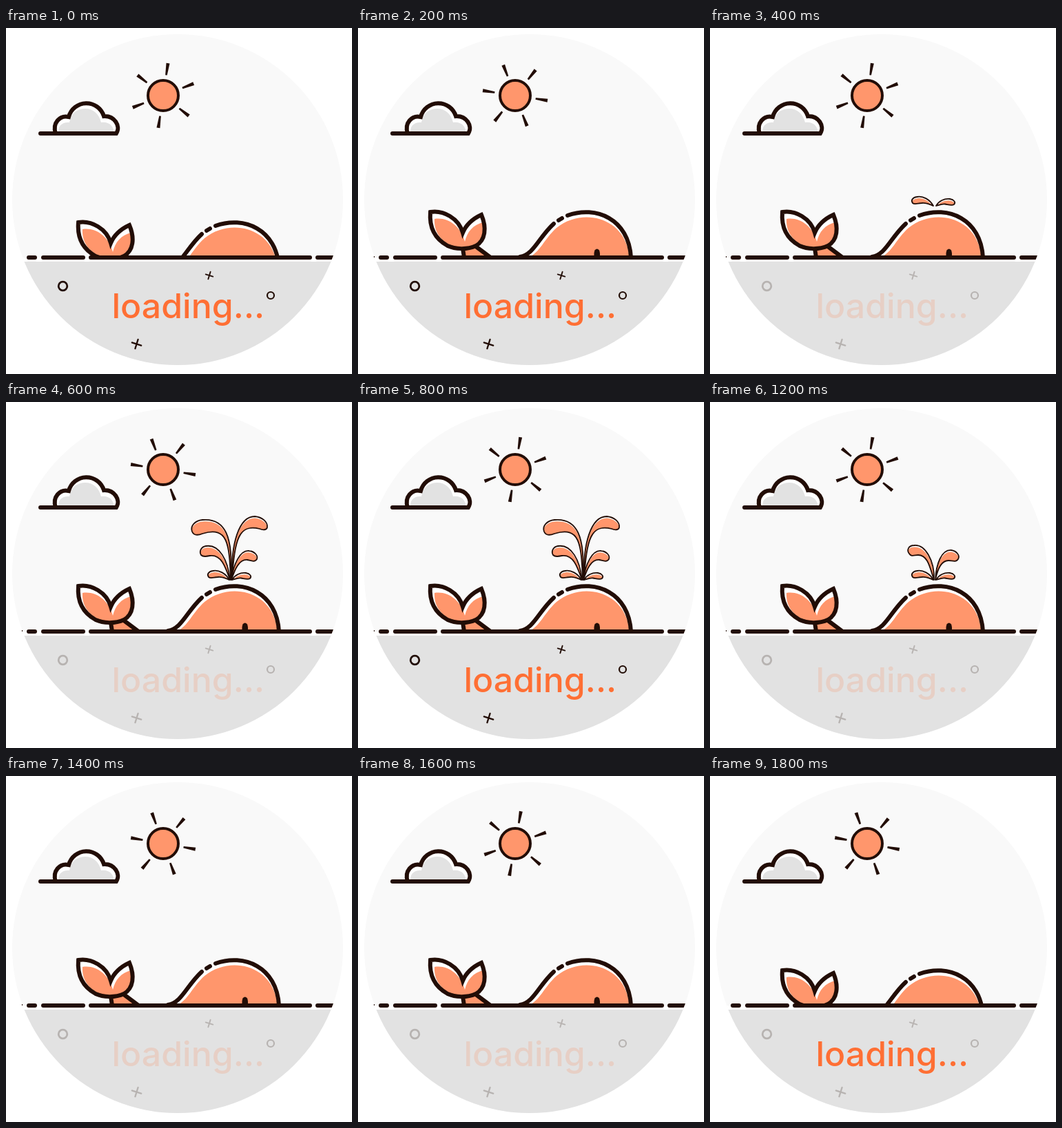
Write an HTML page with a canvas that moves like this. It is 502 px wide and 502 px high and loops after 1900 ms.

```html
<!DOCTYPE html>
<html lang="en">
<head>
<meta charset="utf-8">
<title>Loading whale</title>
<style>
html, body { margin: 0; width: 100%; height: 100%; overflow: hidden; background: #fff; }
canvas { display: block; }
</style>
</head>
<body>
<canvas id="stage" width="502" height="502"></canvas>
<script>
const ctx = document.getElementById('stage').getContext('2d');
const INK = '#220d06', ORANGE = '#ff966c', WHITE = '#fff', GREY = '#e2e2e2';
const LOOP = 1900;

const path = d => new Path2D(d);
const disc = (x, y, r) => {
  const p = new Path2D();
  p.arc(x, y, r, 0, Math.PI * 2);
  return p;
};

const world = disc(249, 249, 240);
const cloud = path('M72 153C67 138 78 126 91 129A26.5 26.5 0 0 1 142 128C157 127 167 142 160 153H50');
const cloudFill = path('M72 153C67 138 78 126 91 129A26.5 26.5 0 0 1 142 128C157 127 167 142 160 153Z');
const cloudShade = path('M77 153C74 142 82 136 92 137C94 123 104 117 115 117S135 124 138 137C148 135 158 142 156 153Z');
const waves = path('M33 333H42M54 333H112M123 333H441M452 333H490');
const waveTip = path('M23 331h1v2h-1z');

const tail = path('M105 267C124 264 146 276 152 297C157 285 166 277 179 271C187 290 185 308 171 316C158 322 141 321 130 316C112 306 103 290 105 267Z');
const tailShade = path('M111 277C130 274 149 287 155 310C158 296 167 285 182 282L183 295C181 309 172 317 160 319L140 318C118 309 110 294 111 277Z');
const stem = path('M152 320L154 333H191Q183 328 171 317Z');
const stemEdge = path('M152 320L154 333M171 317L191 332');
const body = path('M235 333C255 329 262 304 284 284Q292 276 304 272C345 257 393 277 396 333Z');
const bodyShade = path('M247 333C264 326 270 306 288 290C322 262 378 272 391 318L394 333Z');
const bodyEdge = path('M235 332C255 329 262 304 284 284M291 279L296 276M304 272C345 257 393 277 396 333');
const eye = path('M342.5 333V327A4.2 6.5 0 0 1 351 327V333Z');

const smallJets = [
  'M324 258C319 249 309 243 300 245C294 246 291 250 294 254C297 257 302 254 307 254C314 253 319 256 324 258',
  'M328 258C332 251 340 247 348 248C354 249 357 253 354 256C351 258 345 256 341 255.5C336 255 332 257 328 258'
].map(path);
const risingJets = [
  'M325 258C326 230 312 206 296 208C288 208 285 215 289 220C292 225 297 222 302 222C316 222 319 240 325 258',
  'M327 258C328 235 336 214 350 215C358 216 363 223 360 228C357 233 351 230 346 230C335 230 330 243 327 258'
].map(path);
const tallJets = [
  'M326 258C330 195 318 168 285 171C274 172 267 180 270 188C273 195 280 193 285 191C322 180 324 205 326 258',
  'M328 258C326 205 338 166 361 166C372 167 380 174 379 182C378 186 373 186 368 184C338 176 331 200 328 258',
  'M325 258C322 230 310 206 290 209C283 210 280 217 283 222C286 225 291 224 296 223C312 221 318 238 325 258',
  'M327 258C330 235 340 214 353 216C361 217 366 223 364 228C361 233 355 230 350 229C338 228 332 243 327 258'
].map(path);

function fill(p, color) {
  ctx.fillStyle = color;
  ctx.fill(p);
}

function stroke(p, width = 6, cap = 'round') {
  ctx.strokeStyle = INK;
  ctx.lineWidth = width;
  ctx.lineCap = cap;
  ctx.stroke(p);
}

function scoped(draw) {
  ctx.save();
  draw();
  ctx.restore();
}

function jet(p) {
  scoped(() => {
    ctx.clip(p);
    fill(p, WHITE);
    ctx.translate(0, 2.5);
    fill(p, ORANGE);
  });
  stroke(p, 1.8);
}

function sun(turn) {
  scoped(() => {
    ctx.translate(228, 98);
    const face = disc(0, 0, 22);
    fill(face, ORANGE);
    stroke(face, 4);
    ctx.rotate(turn * Math.PI / 180);
    const ray = path('M-2.5 -47.5H2.5L1.3 -30H-1.3Z');
    for (let i = 0; i < 6; i++) {
      fill(ray, INK);
      ctx.rotate(Math.PI / 3);
    }
  });
}

function whale(drop) {
  scoped(() => {
    ctx.beginPath();
    ctx.rect(0, 0, 502, 334);
    ctx.clip();
    ctx.translate(0, drop);
    fill(stem, ORANGE);
    stroke(stemEdge);
    fill(tail, WHITE);
    fill(tailShade, ORANGE);
    stroke(tail);
    fill(body, WHITE);
    fill(bodyShade, ORANGE);
    stroke(bodyEdge);
    fill(eye, INK);
  });
}

function cross(x, y, r, width) {
  scoped(() => {
    ctx.translate(x, y);
    ctx.rotate(0.3);
    stroke(path(`M${-r} 0H${r}M0 ${-r}V${r}`), width);
  });
}

function marks(alpha) {
  scoped(() => {
    ctx.globalAlpha = alpha;
    stroke(disc(82.5, 374.5, 6.3), 2.8);
    stroke(disc(384, 388, 5), 2.2);
    cross(295, 359, 5.5, 1.9);
    cross(189.5, 458.5, 7, 2.3);
  });
}

function label(alpha) {
  scoped(() => {
    ctx.globalAlpha = alpha;
    ctx.fillStyle = '#ff6f34';
    ctx.font = '500 50px Inter, sans-serif';
    ctx.fillText('loading...', 153.5, 421);
  });
}

function spout(t) {
  if (t < 400 || t >= 1400) return;
  if (t >= 600 && t < 1200) tallJets.forEach(jet);
  else if (t >= 500) risingJets.forEach(jet);
  smallJets.forEach(jet);
}

function render(t) {
  const tick = t >= 500 && t < 600 ? 2.5 : Math.floor(t / 200);
  const surfaced = t >= 200 && t < 1800;
  const dimmed = t >= 400 && t < 800 || t >= 1200;

  ctx.clearRect(0, 0, 502, 502);
  fill(world, '#f9f9f9');
  scoped(() => {
    ctx.clip(world);
    ctx.fillStyle = WHITE;
    ctx.fillRect(0, 333, 502, 6);
    ctx.fillStyle = GREY;
    ctx.fillRect(0, 339, 502, 163);
  });
  fill(cloudFill, WHITE);
  fill(cloudShade, GREY);
  stroke(cloud);
  sun(8.5 + 30.2 * tick);
  whale(surfaced ? 0 : 15);
  spout(t);
  scoped(() => {
    ctx.clip(world);
    stroke(waves);
  });
  if (surfaced) fill(waveTip, INK);
  marks(dimmed ? 0.22 : 1);
  label(dimmed && t < 1800 ? 0.17 : 1);
}

function frame() {
  render(performance.now() % LOOP);
  requestAnimationFrame(frame);
}
frame();
</script>
</body>
</html>
```
